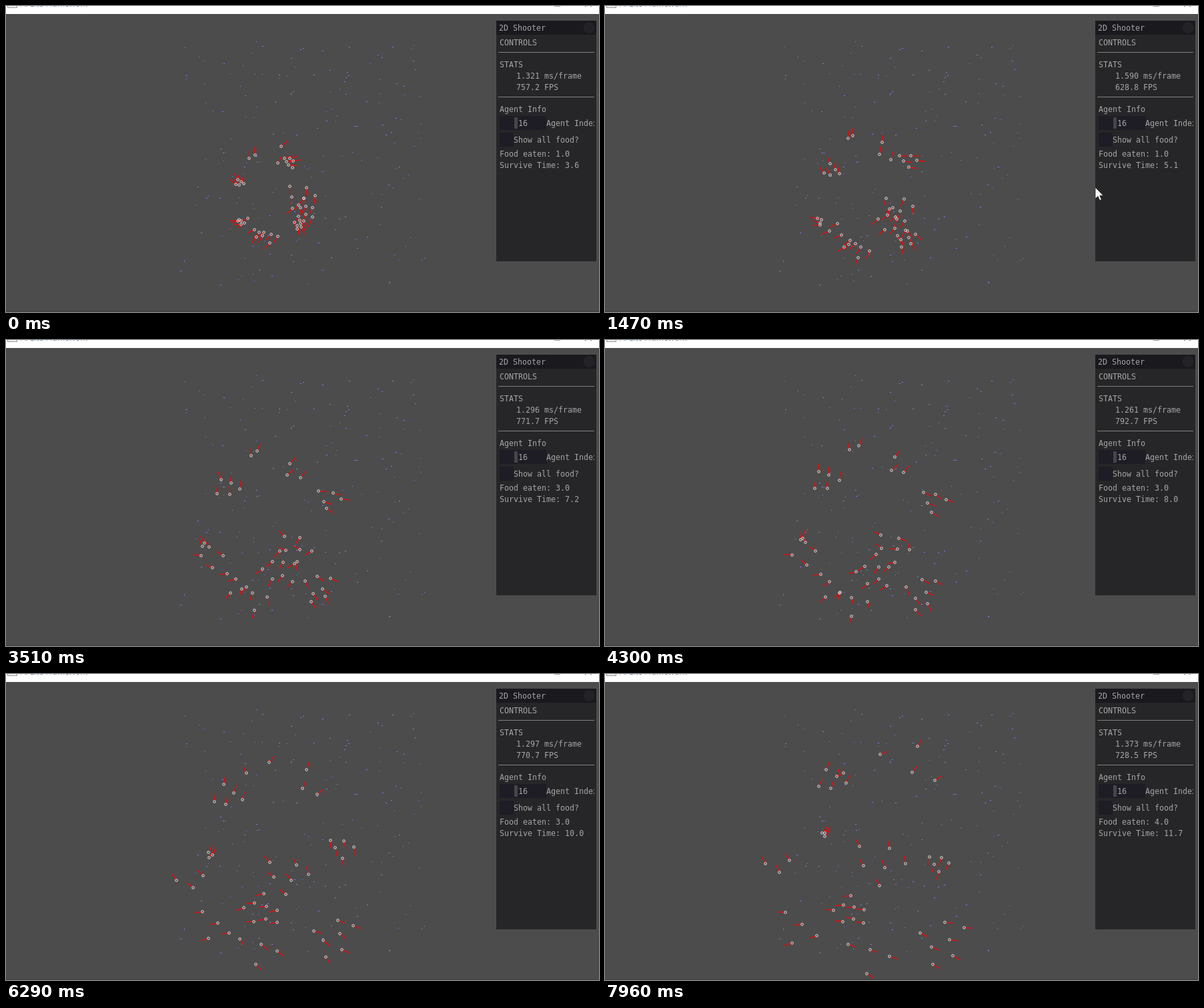
An HTML page with a canvas for the animation above (8 s loop, 889 px wide and 459 px high).

```html
<!DOCTYPE html>
<html lang="en">
<head>
<meta charset="utf-8">
<title>2D Shooter</title>
<style>
html, body { margin: 0; width: 100%; height: 100%; overflow: hidden; background: #4c4c4c; }
canvas { display: block; }
</style>
</head>
<body>
<canvas id="stage" width="889" height="459"></canvas>
<script>
const ctx = document.getElementById('stage').getContext('2d');
const LOOP = 8000;
const MONO = '11.65px "DejaVu Sans Mono", monospace';
const GOLDEN = Math.PI * (3 - Math.sqrt(5));

let seed = 41;
const random = () => (seed = seed * 16807 % 2147483647) / 2147483647;
const between = (a, b) => a + random() * (b - a);

// A flock passes three places [x, y, radius]: at the start, halfway and at the end.
const flock = (count, ...places) => ({ count, places });
const flocks = [
  flock(2, [369, 223, 8], [372, 158, 12], [388, 120, 48]),
  flock(5, [350, 264, 7], [332, 213, 22], [341, 157, 25]),
  flock(3, [413, 227, 24], [430, 192, 18], [470, 134, 38]),
  flock(5, [422, 232, 8], [487, 240, 22], [498, 284, 18]),
  flock(3, [351, 324, 5], [298, 303, 5], [329, 239, 4]),
  flock(3, [355, 322, 9], [300, 330, 24], [256, 288, 24]),
  flock(4, [376, 341, 9], [334, 368, 24], [284, 382, 36]),
  flock(4, [394, 346, 14], [366, 394, 28], [389, 425, 40]),
  flock(7, [439, 326, 9], [471, 374, 28], [505, 397, 42]),
  flock(6, [440, 284, 24], [430, 312, 28], [408, 283, 44]),
  flock(8, [447, 304, 19], [408, 344, 30], [369, 355, 28])
];

// Members are spread evenly over the flock's disc and each sways a little.
const agents = flocks.flatMap(({ count, places }) => {
  const turn = between(0, 7);
  return Array.from({ length: count }, (_, i) => ({
    places,
    angle: turn + i * GOLDEN,
    reach: Math.sqrt((i + .5) / count),
    phase: between(0, 7)
  }));
});

const food = Array.from({ length: 180 }, () => ({
  x: Math.round(between(259, 630)),
  y: Math.round(52 + 368 * random() ** 1.1),
  width: random() < .35 ? 2 : 1
}));

const FPS = [[0, 757.28], [1470, 628.8], [2680, 647.7], [3510, 771.7],
  [5140, 815], [6290, 770.74], [7960, 728.5], [8000, 728]];
const CURSOR = [[450, 745, 470], [850, 735, 272], [2520, 735, 272], [2670, -2, 205], [2730, -2, 205]];

// Linear interpolation in rows of [time, ...values].
function track(rows, t) {
  let i = 1;
  while (i < rows.length - 1 && rows[i][0] < t) i++;
  const a = rows[i - 1], b = rows[i], u = (t - a[0]) / (b[0] - a[0]);
  return a.slice(1).map((v, k) => v + (b[k + 1] - v) * u);
}

function position({ places: [a, b, c], angle, reach, phase }, t) {
  const u = t / LOOP;
  // The parabola through all three places.
  const [x, y, radius] = a.map((v, k) =>
    v * (1 - u) * (1 - 2 * u) + b[k] * 4 * u * (1 - u) + c[k] * u * (2 * u - 1));
  const sway = 4 * Math.sin(u * Math.PI) * Math.sin(u * 9 + phase);
  return [
    x + Math.cos(angle) * reach * radius - Math.sin(angle) * sway,
    y + Math.sin(angle) * reach * radius + Math.cos(angle) * sway
  ];
}

function rect(x, y, w, h, color) {
  ctx.fillStyle = color;
  ctx.fillRect(x, y, w, h);
}

function text(s, x, y, font = MONO, color = '#a6a6a6') {
  ctx.font = font;
  ctx.fillStyle = color;
  ctx.fillText(s, x, y);
}

function drawWindow() {
  rect(0, 0, 889, 459, '#4c4c4c');
  rect(0, 457, 889, 2, '#454545');
  rect(0, 0, 889, 12, '#fff');
  text('AI Lite Framework', 22, 1, '12px "Open Sans", sans-serif', '#6f8ba4');
  rect(2, 0, 15, 3, '#999');
  rect(3, 0, 13, 2, '#eee');
  rect(822, 0, 9, 1, '#aaa');
  rect(868, 0, 2, 1, '#888');
  rect(876, 0, 2, 1, '#888');
}

function drawAgents(t) {
  const placed = agents.map(agent => {
    const [x, y] = position(agent, t), [nx, ny] = position(agent, t + 20);
    return { x: Math.round(x) + .5, y: Math.round(y) + .5, angle: Math.atan2(ny - y, nx - x) };
  });
  ctx.lineWidth = 1.2;
  ctx.strokeStyle = '#f00';
  ctx.beginPath();
  for (const { x, y, angle } of placed) {
    const c = Math.cos(angle), s = Math.sin(angle);
    ctx.moveTo(x + c * 2, y + s * 2);
    ctx.lineTo(x + c * 12, y + s * 12);
  }
  ctx.stroke();
  ctx.lineWidth = 1;
  ctx.strokeStyle = '#ffe4e4';
  for (const { x, y } of placed) {
    ctx.beginPath();
    ctx.arc(x, y, 1.8, 0, 7);
    ctx.stroke();
  }
}

function drawPanel(t) {
  const [fps] = track(FPS, t);
  const eaten = 1 + (t > 1800) + (t > 2300) + (t > 7100);
  const survived = 3.62 + t * .001015;
  rect(735, 22, 150, 361, '#262628');
  rect(735, 22, 150, 21, '#19191e');
  ctx.fillStyle = '#232327';
  ctx.beginPath();
  ctx.arc(874, 32.5, 8.5, 0, 7);
  ctx.fill();
  rect(738, 69, 144, 1, '#808080');
  rect(738, 136, 144, 1, '#808080');
  rect(740, 165, 70, 21, '#1e1c25');
  rect(762, 167, 5, 17, '#45454b');
  rect(740, 190, 21, 21, '#1e1c25');
  ctx.save();
  ctx.beginPath();
  ctx.rect(735, 22, 147, 361);
  ctx.clip();
  text('2D Shooter', 739, 37);
  text('CONTROLS', 740, 59);
  text('STATS', 740, 92);
  text((1000 / fps).toFixed(3) + ' ms/frame', 765, 109);
  text(fps.toFixed(1) + ' FPS', 765, 126);
  text('Agent Info', 740, 159);
  text('16', 768, 180);
  text('Agent Index', 810, 180);
  text('Show all food?', 761, 205);
  text('Food eaten: ' + eaten.toFixed(1), 740, 226);
  text('Survive Time: ' + survived.toFixed(1), 740, 243);
  ctx.restore();
}

function drawCursor(t) {
  if (t < CURSOR[0][0] || t > CURSOR.at(-1)[0]) return;
  const [x, y] = track(CURSOR, t);
  ctx.save();
  ctx.translate(x, y);
  const arrow = new Path2D('M0 0V17L4 13.5L6.7 19.5L9.4 18.3L6.7 12.4H12Z');
  ctx.fillStyle = '#fff';
  ctx.fill(arrow);
  ctx.strokeStyle = '#222';
  ctx.lineWidth = .8;
  ctx.stroke(arrow);
  ctx.restore();
}

function draw(t) {
  drawWindow();
  for (const { x, y, width } of food) rect(x, y, width, 1, '#7e7ef4');
  drawAgents(t);
  drawPanel(t);
  drawCursor(t);
}

const start = performance.now();
function tick() {
  draw((performance.now() - start) % LOOP);
  requestAnimationFrame(tick);
}
tick();
</script>
</body>
</html>
```
